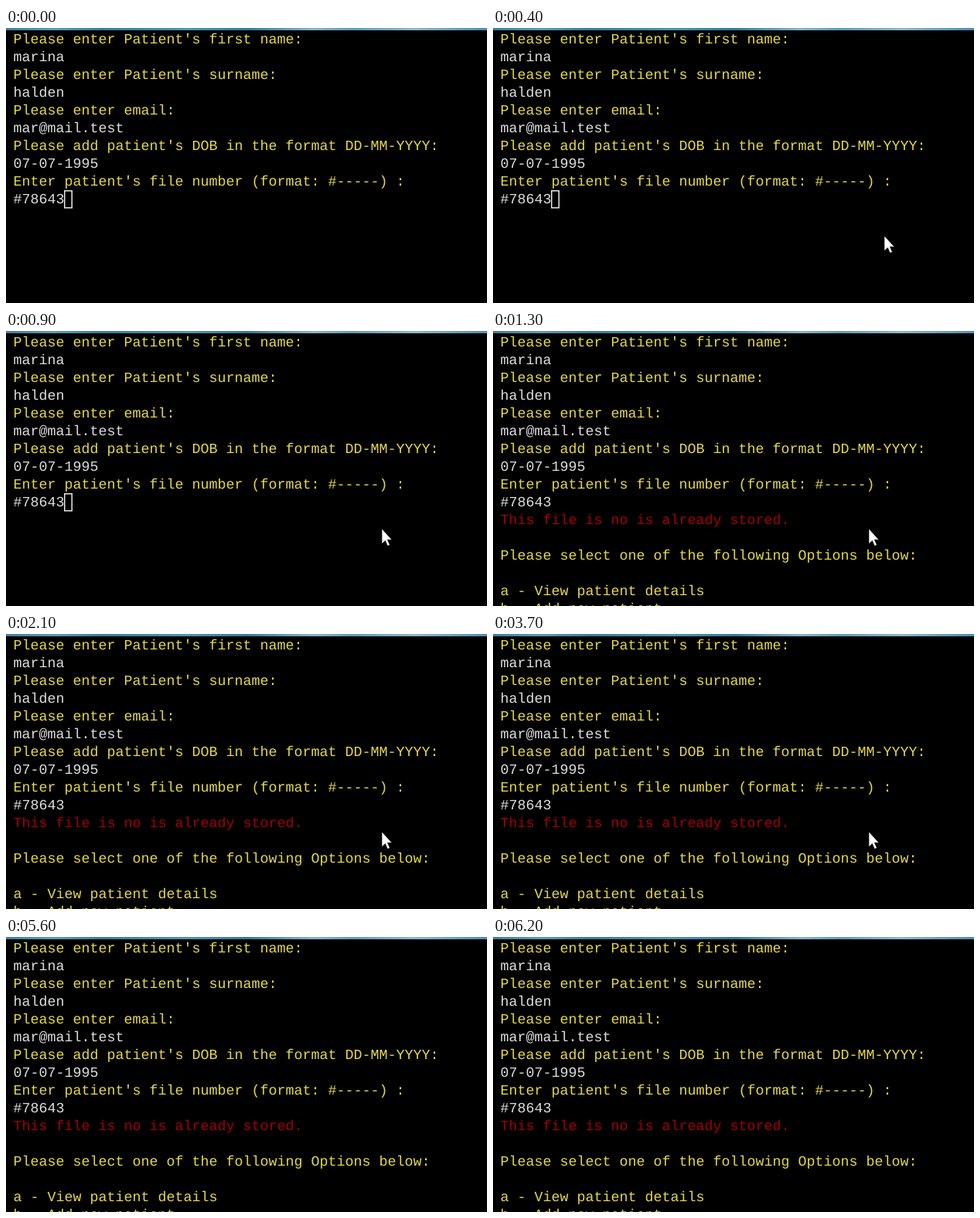
These frames come from a looping animation (622x356 px, 7.2 s). An HTML page:

```html
<!DOCTYPE html>
<html lang="en">
<head>
<meta charset="utf-8">
<title>Patient file terminal</title>
<style>
  html, body { margin: 0; width: 100%; height: 100%; overflow: hidden; background: #000; }
  svg { display: block; width: 622px; height: 356px; }
  text {
    font: 18.33px "Liberation Mono", "DejaVu Sans Mono", monospace;
    text-rendering: geometricPrecision;
  }
  .prompt { fill: #e4d848; }
  .input { fill: #dedede; }
  .error { fill: #a00008; }
</style>
</head>
<body>
<svg viewBox="0 0 622 356">
  <defs>
    <linearGradient id="sky">
      <stop offset="0" stop-color="#3f7f99"/>
      <stop offset=".1" stop-color="#5a9bb2"/>
      <stop offset=".2" stop-color="#3a7c98"/>
      <stop offset=".38" stop-color="#4f94ae"/>
      <stop offset=".5" stop-color="#35799a"/>
      <stop offset=".64" stop-color="#82b6c6"/>
      <stop offset=".72" stop-color="#5c9db4"/>
      <stop offset=".85" stop-color="#88b9c8"/>
      <stop offset="1" stop-color="#4a8fab"/>
    </linearGradient>
  </defs>
  <rect width="622" height="356"/>
  <rect width="622" height="3" fill="url(#sky)"/>
  <g id="form"></g>
  <g id="reply"></g>
  <rect id="caret" x="75.75" y="210.75" width="9.5" height="22" fill="none" stroke="#e6e6e6" stroke-width="1.5"/>
  <path id="pointer" d="M0 0V19.5L4.4 15.4L7.4 22.3L10.4 21L7.4 14.2H13Z" fill="#fff" stroke="#000" stroke-width=".6"/>
</svg>
<script>
const LOOP = 7200, LEFT = 9.5, BASELINE = 20, LINE_HEIGHT = 23;
const byId = id => document.getElementById(id);

const formLines = [
  ["prompt", "Please enter Patient's first name:"],
  ["input", "marina"],
  ["prompt", "Please enter Patient's surname:"],
  ["input", "halden"],
  ["prompt", "Please enter email:"],
  ["input", "mar@mail.test"],
  ["prompt", "Please add patient's DOB in the format DD-MM-YYYY:"],
  ["input", "07-07-1995"],
  ["prompt", "Enter patient's file number (format: #-----) :"],
  ["input", "#78643"]
];
const replyLines = [
  ["error", "This file is no is already stored."],
  ["prompt", ""],
  ["prompt", "Please select one of the following Options below:"],
  ["prompt", ""],
  ["prompt", "a - View patient details"],
  ["prompt", "b - Add new patient"]
];

function writeLines(parent, lines, firstRow) {
  lines.forEach(([kind, content], i) => {
    const line = document.createElementNS("http://www.w3.org/2000/svg", "text");
    line.setAttribute("class", kind);
    line.setAttribute("x", LEFT);
    line.setAttribute("y", BASELINE + (firstRow + i) * LINE_HEIGHT);
    line.textContent = content;
    parent.append(line);
  });
}

// Each step [ms, style] holds until the next one.
function play(element, steps) {
  const frames = steps.map(([ms, style]) => ({ offset: ms / LOOP, easing: "step-end", ...style }));
  frames.push({ ...frames.at(-1), offset: 1 });
  element.animate(frames, { duration: LOOP, iterations: Infinity });
}

const shown = { opacity: 1 }, hidden = { opacity: 0 };
const at = (x, y) => ({ opacity: 1, transform: `translate(${x}px, ${y}px)` });
const away = { opacity: 0, transform: "translate(640px, 370px)" };

writeLines(byId("form"), formLines, 0);
writeLines(byId("reply"), replyLines, formLines.length);

play(byId("caret"), [[0, shown], [1200, hidden]]);
play(byId("reply"), [[0, hidden], [1200, shown]]);
play(byId("pointer"), [
  [0, away],
  [100, at(606, 329)],
  [200, at(578, 318)],
  [300, at(540, 294)],
  [400, at(506, 269)],
  [500, at(486, 256)],
  [4000, at(492, 280)],
  [4100, at(505, 312)],
  [4200, at(518, 343)],
  [4300, away]
]);
</script>
</body>
</html>
```
